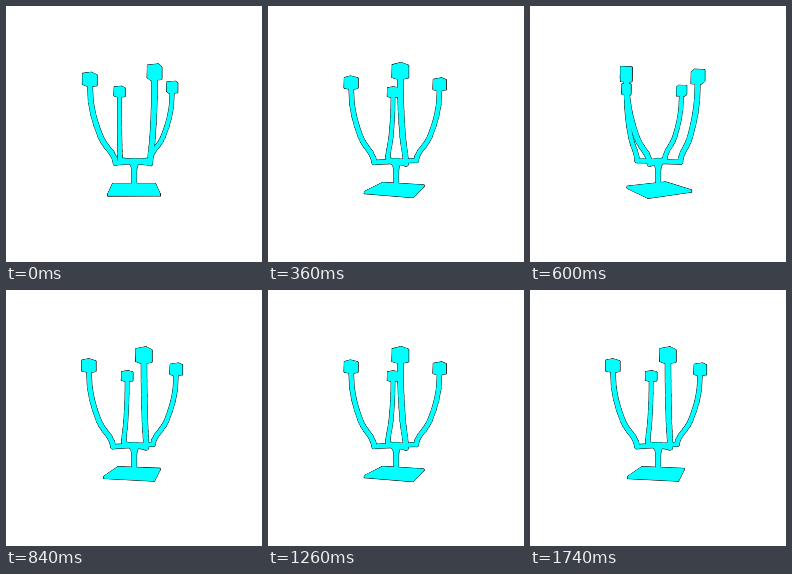
An HTML page with a canvas for the animation above (1800 ms loop, 256 by 256 pixels).

```html
<!DOCTYPE html>
<html lang="en">
<head>
<meta charset="utf-8">
<title>Turning candelabrum</title>
<style>
  html, body { margin: 0; width: 100%; height: 100%; overflow: hidden; background: #fff; }
  canvas { display: block; width: 256px; height: 256px; }
</style>
</head>
<body>
<canvas id="stage"></canvas>
<script>
const LOOP = 1800, STEP = 60;
const CX = 128, HORIZON = 131.4, DIST = 235;
const FOOT = { x: 15, z: 17.3 }, HEAD = { x: 17, z: 41 };
const EDGE = 0.4;

// Arm profile: [share of the way from foot to head, height below the horizon]
const PROFILE = [
  [0, 24], [0.03, 20], [0.15, 14.5], [0.35, 8.5], [0.48, 4], [0.58, -0.5],
  [0.75, -11.5], [0.87, -21.5], [0.96, -33], [1, -50]
];

const canvas = document.getElementById('stage');
const ctx = canvas.getContext('2d');
const ratio = window.devicePixelRatio || 1;
canvas.width = canvas.height = 256 * ratio;
ctx.scale(ratio, ratio);
ctx.lineCap = ctx.lineJoin = 'round';

const mix = (a, b, t) => a + (b - a) * t;

// Turn a point about the vertical axis and put it in perspective.
function project(x, y, z, turn) {
  const c = Math.cos(turn), s = Math.sin(turn);
  const p = DIST / (DIST - (z * c - x * s));
  return { x: CX + (x * c + z * s) * p, y: HORIZON + y * p, p };
}

function paint(grow) {
  ctx.fill();
  if (grow) {
    ctx.lineWidth = grow * 2;
    ctx.stroke();
  }
}

function polygon(points, grow) {
  ctx.beginPath();
  points.forEach(q => ctx.lineTo(q.x, q.y));
  ctx.closePath();
  paint(grow);
}

function rod(points, width, grow) {
  for (let i = 1; i < points.length; i++) {
    const a = points[i - 1], b = points[i];
    ctx.lineWidth = width * (a.p + b.p) / 2 + grow * 2;
    ctx.beginPath();
    ctx.moveTo(a.x, a.y);
    ctx.lineTo(b.x, b.y);
    ctx.stroke();
  }
}

// Upright square block; "corner" is the direction of its first corner.
function block(x, z, radius, corner, topY, lowY, turn, grow) {
  const ring = y => [0, 1, 2, 3].map(k => {
    const a = corner + k * Math.PI / 2;
    return project(x + radius * Math.sin(a), y, z + radius * Math.cos(a), turn);
  });
  const top = ring(topY), low = ring(lowY);
  polygon(top, grow);
  polygon(low, grow);
  top.forEach((q, i) => {
    const j = (i + 1) % 4;
    polygon([q, top[j], low[j], low[i]], grow);
  });
}

function stem(grow) {
  ctx.beginPath();
  ctx.moveTo(122, 153.5);
  ctx.quadraticCurveTo(128, 151, 134, 153.5);
  ctx.lineTo(134, 157);
  ctx.quadraticCurveTo(130.6, 159, 130.6, 165);
  ctx.lineTo(130.6, 180);
  ctx.lineTo(125.8, 180);
  ctx.lineTo(125.8, 165);
  ctx.quadraticCurveTo(125.8, 159, 122, 157);
  ctx.closePath();
  paint(grow);
}

function arm(turn, grow) {
  const hub = project(0, 24, 0, turn);
  const foot = project(FOOT.x, 24, FOOT.z, turn);
  rod([hub, foot], 4.2, grow);
  const curve = PROFILE.map(([t, y]) =>
    project(mix(FOOT.x, HEAD.x, t), y, mix(FOOT.z, HEAD.z, t), turn));
  rod(curve, 4.6, grow);
  block(HEAD.x, HEAD.z, 6.6, Math.PI / 8, -58.7, -48.5, turn, grow);
}

function layer(turn, color, grow) {
  ctx.fillStyle = ctx.strokeStyle = color;
  block(0, 0, 33.2, Math.PI / 4, 50.7, 52.6, turn, grow);
  stem(grow);
  for (let k = 0; k < 4; k++) arm(turn + k * Math.PI / 2, grow);
}

function draw(time) {
  const step = Math.floor((time % LOOP) / STEP);
  const turn = step * STEP / LOOP * 2 * Math.PI;
  ctx.fillStyle = '#fff';
  ctx.fillRect(0, 0, 256, 256);
  layer(turn, '#000', EDGE);
  layer(turn, '#0ff', 0);
}

const start = performance.now();
function tick() {
  draw(performance.now() - start);
  requestAnimationFrame(tick);
}
tick();
</script>
</body>
</html>
```
